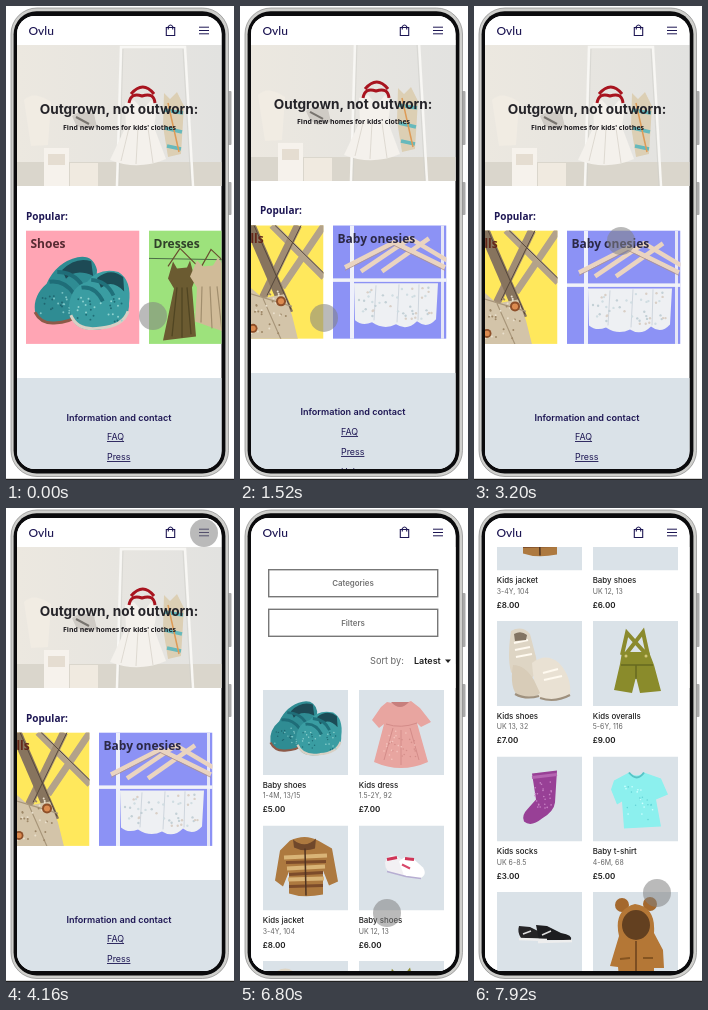
An HTML page that plays this animation: 228 px wide and 474 px high, repeating every 8000 ms.

```html
<!DOCTYPE html>
<html lang="en">
<head>
<meta charset="utf-8">
<title>Clothes shop on a phone</title>
<style>
html, body { margin: 0; width: 100%; height: 100%; overflow: hidden; background: #fff; }
svg { display: block; }
text { white-space: pre; }
</style>
</head>
<body>
<script>
const BRAND = 'Ovlu';
const NAVY = '#1d1653';
const INTER = 'Inter, sans-serif';
const NOTO = "'Noto Sans', sans-serif";

// Drawing helpers
const shape = (d, fill, extra = '') => `<path d="${d}" fill="${fill}" ${extra}/>`;
const line = (d, color, width = 1, extra = '') =>
  `<path d="${d}" fill="none" stroke="${color}" stroke-width="${width}" ${extra}/>`;
const box = (x, y, w, h, fill, extra = '') =>
  `<rect x="${x}" y="${y}" width="${w}" height="${h}" fill="${fill}" ${extra}/>`;
const dot = (x, y, r, fill) => `<circle cx="${x}" cy="${y}" r="${r}" fill="${fill}"/>`;
const label = (x, y, text, size, weight, fill, extra = '', font = INTER) =>
  `<text x="${x}" y="${y}" font-family="${font}" font-size="${size}" font-weight="${weight}" fill="${fill}" ${extra}>${text}</text>`;
const group = (transform, content) => `<g transform="${transform}">${content}</g>`;
const tile = (x, y, size, fill, content) =>
  `<svg x="${x}" y="${y}" width="${size}" height="${size}">${box(0, 0, size, size, fill)}${content}</svg>`;
const MIDDLE = 'text-anchor="middle"';

function speckles(seed, count, x, y, w, h, colors, r) {
  const random = () => (seed = (seed * 16807) % 2147483647) / 2147483647;
  let out = '';
  for (let i = 0; i < count; i++)
    out += dot((x + random() * w).toFixed(1), (y + random() * h).toFixed(1), r, colors[i % colors.length]);
  return out;
}

// Garments
const babyShoes =
  shape('M2 60Q0 44 14 32Q24 10 46 5Q62 2 66 18L64 48Q42 74 20 72Q6 72 2 60Z', '#2f8c93') +
  line('M2 61Q8 73 22 72Q38 72 50 62', '#8d5a48', 3) +
  shape('M30 18Q44 4 60 9L62 24Q44 16 34 27Z', '#1d4a55') +
  line('M17 30Q32 28 42 42M25 20Q42 20 51 34', '#1f6d78', 4) +
  speckles(7, 24, 8, 40, 32, 24, ['#7cc4c4', '#1f6670'], 1) +
  shape('M37 54Q40 34 56 30Q68 15 88 20Q102 28 99 52Q100 70 80 76Q50 84 41 70Z', '#3a9da2') +
  line('M39 64Q46 81 70 77Q93 75 98 60', '#d8d0c4', 3) +
  shape('M66 26Q80 15 93 25L94 40Q82 27 70 36Z', '#1b4c56') +
  line('M50 36Q64 34 72 50M60 28Q76 29 83 44', '#20717b', 4) +
  speckles(19, 32, 46, 46, 46, 26, ['#8fd2cf', '#1f6d76'], 1);

const pinkDress =
  shape('M28 12Q43 16 52 11L61 18L72 32L62 37L58 33L69 72Q42 84 15 72L25 34L20 38L13 30L22 17Z', '#e8a5a0') +
  shape('M32 12Q41 22 50 12Z', '#c77f7d') +
  line('M27 34Q42 39 58 33M25 70L34 38M42 75L42 40M60 70L51 38', '#d48c89') +
  speckles(5, 34, 25, 40, 33, 32, ['#f4c4be', '#d58e8a'], .8);

const jacket =
  shape('M27 15Q42 8 55 15L69 23L75 56L66 60L60 45L60 69Q40 73 26 68L26 46L20 61L12 55L17 25Z', '#ad793f') +
  shape('M30 14Q42 24 53 13L52 23Q41 27 31 22Z', '#70482b') +
  line('M21 32L64 30M24 43L62 41M25 54L61 53', '#d9b477', 4) +
  line('M23 37L63 36M26 49L60 47M26 61L60 60', '#7c4b2a', 3) +
  line('M42 23L43 70', '#4f3422', 1.5);

const whiteSneakers =
  shape('M26 37Q30 27 38 31L55 41Q58 50 49 51L34 48Q26 46 26 37Z', '#f2f0f3') +
  shape('M40 36Q47 29 54 33L64 42Q69 50 60 53L45 50Z', '#fff') +
  line('M28 34L38 32M46 33L55 34', '#cf3557', 3) +
  line('M28 46L47 51L62 53', '#b7aed2', 1.5) + line('M43 39L51 43', '#d8486a', 2);

const creamShoes =
  shape('M14 10Q25 4 33 13L39 36Q42 51 35 57Q20 61 14 51Q10 37 14 10Z', '#ded5c4') +
  shape('M35 42Q49 31 62 42Q75 56 73 74Q58 83 43 77Q37 68 35 42Z', '#e9e1d3') +
  shape('M16 44Q28 44 37 59L43 72Q35 80 22 76Q12 68 16 44Z', '#d8ccb8') +
  line('M17 22L31 19M18 29L33 26M19 36L35 33M46 52L61 48M47 59L65 55', '#fffaf0', 2) +
  line('M43 77Q58 82 73 74M18 73Q29 79 42 75', '#9f917e', 2) +
  shape('M17 13Q24 9 30 14L29 19L18 20Z', '#827463');

const greenOveralls =
  line('M29 34L34 12L53 33M55 34L50 11L33 33', '#8b8a2d', 4) +
  shape('M29 31L56 31L61 44L68 70L47 72L43 56L39 72L21 69L27 43Z', '#8a8b2b') +
  line('M28 44L60 44M43 44L43 58', '#66691f', 1.5) + dot(33, 35, 1.5, '#d2c779') + dot(53, 35, 1.5, '#d2c779');

const sock =
  shape('M35 17L60 14L58 46Q57 55 45 62Q34 71 27 65Q24 59 31 52L39 43Z', '#984096') +
  line('M35 21L60 18', '#b565b2', 3) + speckles(11, 24, 38, 25, 17, 32, ['#c884c6'], .8);

const tshirt =
  shape('M21 24L36 16Q44 22 51 16L68 22L75 38L63 43L68 70L31 72L29 45L24 48L18 33Z', '#8cf0ee') +
  line('M36 16Q44 26 51 16', '#58c4c6', 2) + speckles(23, 24, 32, 29, 28, 36, ['#cfffff', '#65d4d7'], .8);

const blackSneakers =
  shape('M22 34L33 35L43 40Q52 43 49 47L24 46Q20 40 22 34Z', '#252426') +
  shape('M39 33L50 34L64 41Q76 43 74 48L42 48Z', '#1d1d20') +
  line('M22 47L50 48M41 50L75 49', '#eee', 2.5) + line('M26 42L34 39M45 43L54 39', '#ddd', 1.5);

const bearJacket =
  dot(29, 13, 7, '#a4682d') + dot(57, 12, 7, '#a4682d') +
  shape('M26 44Q20 18 42 12Q63 15 61 41L70 58L71 76L61 76L61 85L26 85L25 75L17 74Z', '#b47736') +
  `<ellipse cx="43" cy="33" rx="14" ry="15" fill="#634020"/>` +
  line('M43 49L43 85', '#6a411d', 1.5) + line('M27 67L37 66M50 66L60 66', '#855420', 2);

const hangingDresses =
  line('M0 28L114 30', '#38513a', .8) +
  line('M19 36L31 18L47 34M52 37L62 19L79 35', '#694d30', 1.2) +
  shape('M24 31L28 38L38 37L41 30L46 49L43 57L47 106L14 110L25 58L19 48Z', '#6b5b31') +
  line('M28 57L23 106M33 57L33 107M38 57L42 104', '#504522', 1.3) +
  shape('M48 30L54 36L64 35L69 27L82 47L74 58L80 103L46 91L48 57L41 46Z', '#d0bb98') +
  line('M53 56L52 92M61 56L63 98M68 56L73 101', '#a18e6e', 1.2) +
  shape('M88 0L104 3L114 28L114 110L85 97L95 48L83 32Z', '#a9192a') +
  line('M101 25L95 91M107 30L108 97', '#700f22', 3);

const beigeOveralls =
  line('M62 0L114 52M114 0L72 62', '#b3a28a', 7) +
  line('M88 0L52 74', '#a08c74', 8) + line('M40 0L78 88', '#87745e', 11) +
  line('M44 0L81 84M65 0L114 48M91 0L57 70', '#55473b', 1) +
  shape('M0 64L20 55L38 60L53 73L74 69L82 90L88 114L0 114Z', '#d3c4a9') +
  line('M0 82L39 68L82 81M17 114L39 68M53 73L71 114', '#a8967a', 1.2) +
  speckles(31, 55, 3, 65, 74, 47, ['#9d8767', '#e9dfcc'], 1) +
  dot(71, 76, 5, '#8e4f29') + dot(71, 76, 3, '#dc8b50') + dot(43, 103, 4.5, '#8e4f29') + dot(43, 103, 2.7, '#dc8b50');

const onesies =
  box(17, 0, 4, 114, '#eef0fb') + box(108, 0, 3, 114, '#e6e6f6') +
  line('M12 42L61 17L112 42M28 46L77 13L114 35M49 46L96 13', '#ead4c0', 4.5) +
  line('M12 45L61 20L112 45', '#b09486', .8) +
  box(0, 53, 114, 3.5, '#f1f2f8') +
  shape('M21 58H105L103 94Q94 104 84 96Q74 106 63 99Q51 105 39 97Q29 101 22 95Z', '#eef0f3') +
  line('M43 60L41 95M66 59L64 97M86 59L85 95', '#cfd6de') +
  speckles(41, 44, 26, 62, 74, 32, ['#c3d0d6', '#d9cfc6', '#d0dde2'], 1.2);

// Pages
const hero =
  box(11, 39, 205, 141, 'url(#wall)') +
  box(11, 156, 205, 24, '#dad6cc') +
  shape('M18 94Q28 84 45 96L42 139L25 140Z', '#f1ece3') +
  box(38, 142, 25, 38, '#f6f2ec') + box(64, 157, 28, 23, '#f0eae0') + box(42, 148, 17, 11, '#e5ddd1') +
  shape('M66 110Q75 103 88 108L91 121L78 124L70 119Z', '#cfcbc5') + line('M70 111L83 118', '#77736e', 2) +
  line('M111 180L115 41L179 41L187 180', '#f8f7f4', 2.5) +
  line('M113 180L117 43M177 43L185 180', '#cfceca', .6) +
  shape('M119 97L128 94L137 104L145 94L151 101L148 121L160 153Q132 165 104 154L120 120Z', '#f4f1ec') +
  line('M123 122L115 155M132 122L130 158M142 122L147 157', '#d9d4cb', .8) +
  line('M123 97Q125 86 136 90Q148 86 149 97M125 88Q137 74 148 88', '#a8141f', 3) +
  shape('M158 87L164 93L171 86L178 100L175 148L162 151L157 120Z', '#dccfb4') +
  line('M158 104L177 107M159 122L176 126M161 140L175 143', '#66b9bc', 3.5) + line('M162 97L173 146', '#dd9b57', 1.5) +
  label(113, 108, 'Outgrown, not outworn:', 13.6, 700, '#252429', MIDDLE) +
  label(113.5, 123.5, "Find new homes for kids' clothes", 6.94, 700, '#1e1c20', MIDDLE, NOTO);

const categories = [
  ['Shoes', '#ffa5b4', '#562a31', group('translate(7 22) scale(.97 .98)', babyShoes)],
  ['Dresses', '#9de27c', '#30402a', hangingDresses],
  ['Overalls', '#ffe85c', '#642719', beigeOveralls],
  ['Baby onesies', '#8c92f5', '#2c2946', onesies],
].map(([name, fill, ink, art], i) =>
  tile(20 + i * 123, 224.4, 113.5, fill, art + label(4.5, 17.6, name, 12, 700, ink, '', NOTO))).join('');

const link = (x, y, text) => label(x, y, text, 8.9, 400, NAVY, 'text-decoration="underline"');
const footer =
  box(11, 372, 205, 230, '#dae2e8') +
  label(113, 414.5, 'Information and contact', 9.1, 600, NAVY, MIDDLE) +
  link(101, 434, 'FAQ') + link(101, 454, 'Press') + link(101, 474, 'Help') +
  label(113, 502, 'About ' + BRAND, 9.1, 600, NAVY, MIDDLE) +
  link(94, 522, 'About us') + link(94, 542, 'Careers') +
  [56, 113, 170].map(x => box(x - 6.5, 565.5, 13, 13, NAVY)).join('');

const home = hero + label(20, 213.5, 'Popular:', 10, 700, NAVY, '', NOTO) +
  `<g id="carousel">${categories}</g>` + footer;

const button = (y, text) =>
  box(28.7, y, 169, 27, '#fff', 'stroke="#777" stroke-width="1.4"') +
  label(113, y + 16.4, text, 7.9, 600, '#747474', MIDDLE);

// Name, size, price, art, time the picture appears
const products = [
  ['Baby shoes', '1-4M, 13/15', '£5.00', group('translate(6 8) scale(.73)', babyShoes), 5120],
  ['Kids dress', '1.5-2Y, 92', '£7.00', pinkDress, 5360],
  ['Kids jacket', '3-4Y, 104', '£8.00', jacket, 5600],
  ['Baby shoes', 'UK 12, 13', '£6.00', whiteSneakers, 5840],
  ['Kids shoes', 'UK 13, 32', '£7.00', creamShoes, 5920],
  ['Kids overalls', '5-6Y, 116', '£9.00', greenOveralls, 6000],
  ['Kids socks', 'UK 6-8.5', '£3.00', sock, 6160],
  ['Baby t-shirt', '4-6M, 68', '£5.00', tshirt, 6160],
  ['', '', '', blackSneakers, 6160],
  ['', '', '', bearJacket, 6160],
];

const listing = button(61.7, 'Categories') + button(101.3, 'Filters') +
  label(130, 156, 'Sort by:', 9.2, 400, '#666') + label(174, 156, 'Latest', 9, 600, '#1c1c1c') +
  shape('M205 151.5H211L208 155Z', '#222') +
  products.map(([name, size, price, art, at], i) => {
    const x = 23 + (i % 2) * 96, y = 182 + Math.floor(i / 2) * 135.5;
    return tile(x, y, 85, '#dae2e8', `<g data-at="${at}">${art}</g>`) +
      label(x - .3, y + 97.5, name, 7.9, 500, '#1c1c1c') +
      label(x - .3, y + 108.2, size, 7, 400, '#666') +
      label(x - .3, y + 122.3, price, 8, 600, '#1c1c1c');
  }).join('');

const header = box(11, 10, 205, 29, '#fff') +
  label(22.5, 28.5, BRAND, 12, 500, NAVY, '', 'Lato, sans-serif') +
  line('M160.3 21.5H168.7V29.5H160.3ZM162.3 23.5V20.5Q164.5 17.5 166.7 20.5V23.5', NAVY, 1.1) +
  line('M193 21.2H203M193 24.5H203M193 27.8H203', NAVY, 1);

const phone =
  box(0, 472.8, 228, 1.2, '#222') +
  box(221, 85, 4.5, 54, '#aaa', 'rx="1"') + box(221, 176, 4.5, 33, '#aaa', 'rx="1"') +
  box(5, 2, 217.5, 468.5, '#cfcfcc', 'rx="26" stroke="#888" stroke-width=".7"') +
  box(7.6, 5.2, 211.8, 462.4, '#0b0b0d', 'rx="23"') +
  box(11, 10, 204.5, 453, '#fff', 'rx="18"');

document.body.innerHTML = `<svg width="228" height="474" viewBox="0 0 228 474">
  <defs>
    <linearGradient id="wall"><stop stop-color="#ece8e0"/><stop offset="1" stop-color="#e2e2e0"/></linearGradient>
    <clipPath id="screen"><rect x="11" y="10" width="204.5" height="453" rx="18"/></clipPath>
  </defs>
  ${phone}
  <g clip-path="url(#screen)">
    <g id="home">${home}</g>
    ${box(11, 39, 205, 430, '#fff', 'id="cover"')}
    <g id="listing">${listing}</g>
    ${header}
  </g>
  <circle id="touch" r="14" fill="#828282" fill-opacity=".55"/>
</svg>`;

// Motion: rows of time followed by values. Content follows the finger while it drags.
const LISTING_AT = 5040;
const tracks = {
  carousel: [[0, 0], [640, -223], [1040, -223], [1360, -296]],
  homeScroll: [[1440, 0], [2080, -117], [2560, -117], [3120, 0]],
  cover: [[4240, 0], [4560, 1]],
  listingScroll: [[7280, 0], [7680, -340]],
  touch: [
    [0, 147, 310], [640, -76, 310], [720, -70, 310], [880, 30, 312], [1040, 157, 317],
    [1360, 84, 317], [1440, 84, 317], [2080, 84, 200], [2320, 84, 200],
    [2560, 147, 118], [3120, 147, 235], [3520, 147, 235], [4160, 198, 25], [4320, 198, 25],
    [4880, 97, 111], [6240, 97, 111], [6800, 147, 405], [7120, 177, 430], [7280, 177, 430],
    [7680, 190, 90], [7920, 183, 385],
  ],
};
const smooth = u => u * u * (3 - 2 * u);

function sample(rows, time) {
  const next = rows.findIndex(row => row[0] > time);
  if (next === 0) return rows[0].slice(1);
  if (next < 0) return rows[rows.length - 1].slice(1);
  const from = rows[next - 1], to = rows[next];
  const u = smooth((time - from[0]) / (to[0] - from[0]));
  return from.slice(1).map((value, i) => value + (to[i + 1] - value) * u);
}

const part = id => document.getElementById(id);
const pictures = [...document.querySelectorAll('[data-at]')];
const move = (id, x, y) => part(id).setAttribute('transform', `translate(${x} ${y})`);
const show = (node, visible) => node.setAttribute('display', visible ? 'inline' : 'none');

function draw(now) {
  const time = Math.floor((now % 8000) / 80) * 80;
  move('carousel', sample(tracks.carousel, time)[0], 0);
  move('home', 0, sample(tracks.homeScroll, time)[0]);
  move('listing', 0, sample(tracks.listingScroll, time)[0]);
  move('touch', ...sample(tracks.touch, time));
  part('cover').setAttribute('opacity', sample(tracks.cover, time)[0]);
  show(part('listing'), time >= LISTING_AT);
  pictures.forEach(picture => show(picture, time >= +picture.dataset.at));
}

const start = performance.now();
function tick() {
  draw(performance.now() - start);
  requestAnimationFrame(tick);
}
tick();
</script>
</body>
</html>
```
